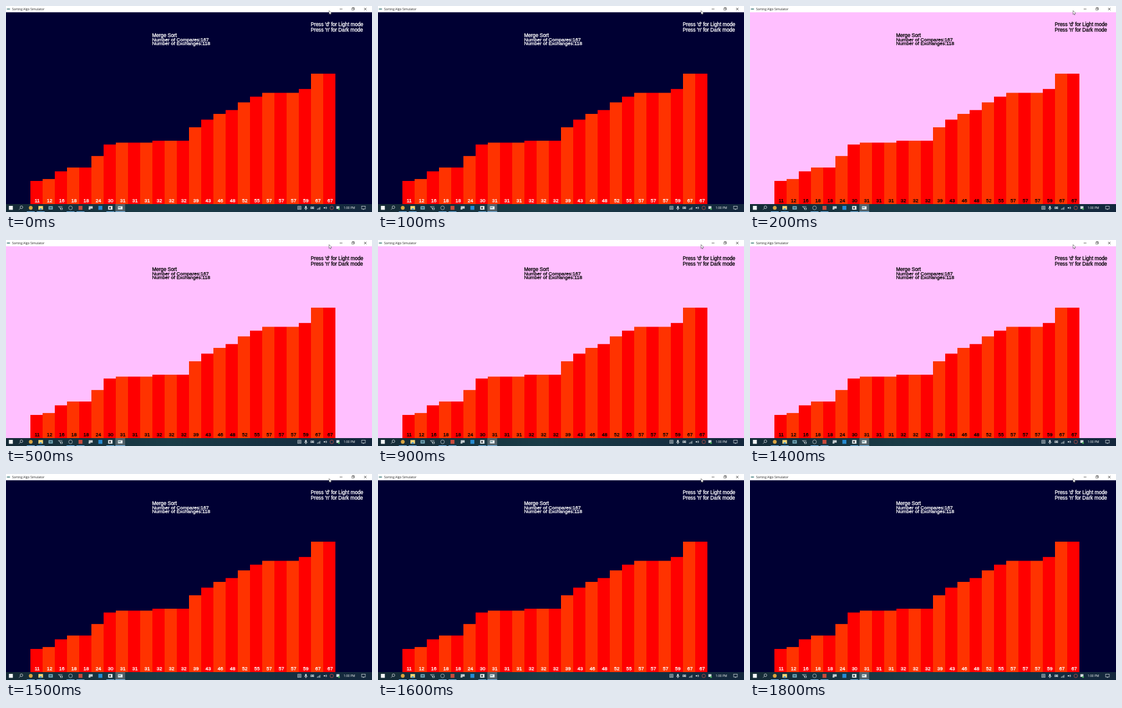
Recreate the animation shown at these times as an HTML page with a canvas. Size 600 px wide and 338 px high, loop 1900 ms.

```html
<!DOCTYPE html>
<html lang="en">
<head>
<meta charset="utf-8">
<title>Sorting Algo Simulator</title>
<style>
html, body { margin: 0; width: 100%; height: 100%; overflow: hidden; background: #000033; }
canvas { display: block; width: 600px; height: 338px; }
</style>
</head>
<body>
<canvas id="stage" width="600" height="338"></canvas>
<script>
const ctx = document.getElementById('stage').getContext('2d');
const LOOP = 1900, LIGHT_FROM = 200, LIGHT_TO = 1500;
const BAR_W = 20, LEFT = 40, FLOOR = 325, UNIT = 22 / 7;
const SANS = '"Liberation Sans", Arial, sans-serif';
const UI = '"Open Sans", "Noto Sans", sans-serif';
const PALE = '#d8dee2', GREY = '#333333';
const themes = {
  dark: { back: '#000033', ink: '#ffffff' },
  light: { back: '#ffbfff', ink: '#000000' }
};
// The sorted list; each value is also a bar's label.
const values = [11, 12, 16, 18, 18, 24, 30, 31, 31, 31, 32, 32, 32, 39, 43,
  46, 48, 52, 55, 57, 57, 57, 59, 67, 67];

function rect(x, y, w, h, color) {
  ctx.fillStyle = color;
  ctx.fillRect(x, y, w, h);
}

function box(x, y, w, h, color) {
  rect(x - w / 2, y - h / 2, w, h, color);
}

function frame(x, y, w, h, color) {
  ctx.strokeStyle = color;
  ctx.lineWidth = 0.7;
  ctx.strokeRect(x - w / 2, y - h / 2, w, h);
}

function line(x1, y1, x2, y2, color) {
  ctx.beginPath();
  ctx.moveTo(x1, y1);
  ctx.lineTo(x2, y2);
  ctx.strokeStyle = color;
  ctx.lineWidth = 0.7;
  ctx.stroke();
}

function dot(x, y, r, color) {
  ctx.beginPath();
  ctx.arc(x, y, r, 0, Math.PI * 2);
  ctx.fillStyle = color;
  ctx.fill();
}

function ring(x, y, r, color, from = 0, to = Math.PI * 2) {
  ctx.beginPath();
  ctx.arc(x, y, r, from, to);
  ctx.strokeStyle = color;
  ctx.lineWidth = 0.8;
  ctx.stroke();
}

function text(str, x, y, size, color, family = SANS, weight = 0) {
  ctx.font = `${size}px ${family}`;
  ctx.fillStyle = color;
  ctx.fillText(str, x, y);
  if (!weight) return;
  ctx.strokeStyle = color;
  ctx.lineWidth = weight;
  ctx.strokeText(str, x, y);
}

function titleBar() {
  rect(0, 0, 600, 10.3, '#ffffff');
  box(4, 5, 5, 2, '#6f9c9c');
  text('Sorting Algo Simulator', 10, 6.9, 5.1, '#222222', UI);
  line(547, 5, 551.5, 5, GREY);
  frame(569.4, 4.4, 3, 3, GREY);
  frame(568.6, 5.2, 3, 3, GREY);
  box(568.6, 5.2, 2.3, 2.3, '#ffffff');
  for (const s of [-2, 2]) line(587, 5 - s, 591, 5 + s, GREY);
}

function cursor() {
  ctx.beginPath();
  ctx.moveTo(529.6, 7.6);
  ctx.lineTo(529.6, 13.8);
  ctx.lineTo(531, 12.6);
  ctx.lineTo(532.3, 14.8);
  ctx.lineTo(532.4, 12.2);
  ctx.lineTo(534, 12.1);
  ctx.closePath();
  ctx.fillStyle = '#ffffff';
  ctx.fill();
  ctx.strokeStyle = '#222222';
  ctx.lineWidth = 0.5;
  ctx.stroke();
}

// Icons sit in evenly spaced slots; each draws around its own centre (x, y).
const apps = [
  { icon(x, y) { box(x, y, 6.5, 6.5, '#f2f5f6'); } },
  { icon(x, y) { ring(x + 1, y - 1, 2.2, PALE); line(x - 0.6, y + 0.6, x - 3, y + 3, PALE); } },
  { open: true, icon(x, y) { dot(x, y, 3.1, '#d9a441'); } },
  { open: true, icon(x, y) { box(x, y, 7.5, 6, '#f8d775'); box(x, y + 2, 3.5, 2.5, '#4b9cd3'); } },
  { icon(x, y) { box(x, y, 7, 5.5, '#78aebf'); box(x, y, 4, 2.5, '#3c6675'); } },
  { icon(x, y) { line(x - 4, y - 2, x + 3, y - 2, PALE); line(x - 3, y - 2, x, y + 2, PALE); frame(x + 1.5, y + 1.5, 3, 2.5, PALE); } },
  { open: true, icon(x, y) { ring(x, y, 3.1, '#b5bbc0'); } },
  { open: true, icon(x, y) { box(x, y, 6.5, 6.5, '#c94a3c'); } },
  { icon(x, y) { box(x + 0.5, y - 0.7, 6.5, 4, '#c5cdd1'); box(x - 1.5, y + 1.8, 3, 2, '#c5cdd1'); } },
  { icon(x, y) { box(x, y, 6.5, 6.5, '#268bd2'); } },
  { open: true, icon(x, y) { box(x, y, 7, 6, '#eef1f2'); box(x - 0.5, y, 2.5, 3, '#30363b'); } },
  { open: true, active: true, icon(x, y) { box(x, y, 7.5, 5, '#edf2f4'); box(x - 1, y - 0.5, 4, 1.5, '#5c8990'); } }
];

const tray = [
  (x, y) => { frame(x, y, 5.5, 5, PALE); line(x, y - 2.5, x, y + 2.5, PALE); line(x - 2.7, y, x + 2.7, y, PALE); },
  (x, y) => { box(x, y - 1, 2.4, 4, PALE); ring(x, y, 2.2, PALE, 0, Math.PI); line(x, y + 2, x, y + 3.8, PALE); },
  (x, y) => { frame(x, y, 5, 3, PALE); box(x, y, 3, 1.6, PALE); },
  (x, y) => { for (let i = 0; i < 4; i++) rect(x - 3 + i * 1.5, y + 1.5 - i, 1.1, 1.5 + i, '#9aa7ae'); },
  (x, y) => { box(x - 1.5, y, 2, 2, PALE); for (const r of [1.4, 2.8]) ring(x - 0.6, y, r, PALE, -0.8, 0.8); },
  (x, y) => { ring(x, y, 2.9, '#c0504a'); },
  (x, y) => { box(x - 0.5, y - 0.5, 5, 4.5, PALE); dot(x + 1.3, y + 1.8, 1.5, '#4bb75c'); }
];

function taskBar() {
  const shade = ctx.createLinearGradient(0, 0, 600, 0);
  shade.addColorStop(0, '#152a36');
  shade.addColorStop(0.45, '#1a3c47');
  shade.addColorStop(1, '#13263c');
  rect(0, FLOOR, 600, 13, shade);
  apps.forEach(({ icon, open, active }, i) => {
    const x = 8 + i * 16.3;
    if (active) box(x, 331.5, 16, 13, '#53636b');
    if (open) box(x, 337.5, active ? 16 : 13, 1, '#76b9ed');
    icon(x, 331.2);
  });
  tray.forEach((icon, i) => icon(481 + i * 10.6, 331.2));
  text('1:00 PM', 553.5, 332.9, 5, '#ffffff', UI);
  frame(586, 330.8, 6, 4.5, PALE);
  box(586, 333.6, 1.5, 1.2, PALE);
}

function draw(t) {
  const { back, ink } = t >= LIGHT_FROM && t < LIGHT_TO ? themes.light : themes.dark;
  const label = (str, x, y, size = 8.1) => text(str, x, y, size, ink, SANS, 0.3);
  rect(0, 0, 600, 338, back);
  titleBar();
  label('Merge Sort', 239.5, 51, 8.2);
  label('Number of Compares:167', 239.5, 57.6);
  label('Number of Exchanges:118', 239.5, 63.7);
  label("Press 'd' for Light mode", 499.5, 32.5, 8.25);
  label("Press 'n' for Dark mode", 499.5, 42, 8.25);
  values.forEach((v, i) => {
    const x = LEFT + i * BAR_W, h = v * UNIT + 3.4;
    rect(x, FLOOR - h, BAR_W, h, i % 2 ? '#ff3300' : '#ff0000');
    label(v, x + 7, 321.6, 8);
  });
  taskBar();
  cursor();
}

const start = performance.now();
function tick() {
  draw((performance.now() - start) % LOOP);
  requestAnimationFrame(tick);
}
tick();
</script>
</body>
</html>
```
